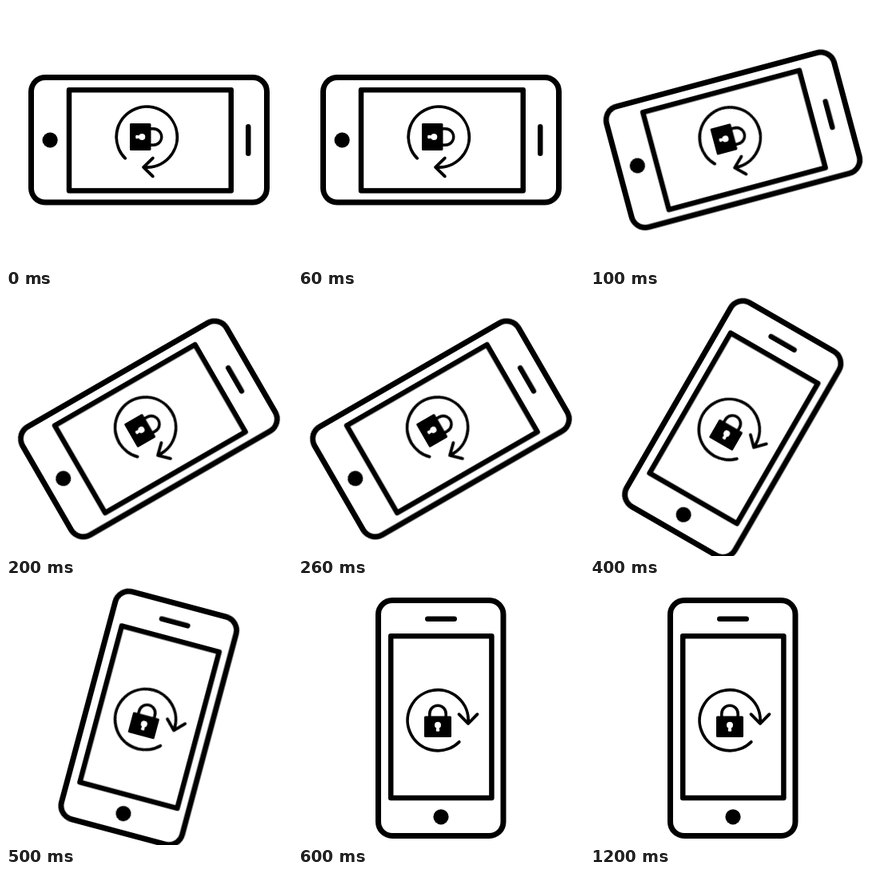
Write an HTML page that moves like this. It is 358 px wide and 327 px high and loops after 1600 ms.

```html
<!DOCTYPE html>
<html lang="en">
<head>
<meta charset="utf-8">
<title>Rotate phone</title>
<style>
  html, body {
    margin: 0;
    width: 100%;
    height: 100%;
    overflow: hidden;
    background: #fff;
  }
  svg {
    display: block;
    width: 358px;
    height: 327px;
  }
  .phone {
    fill: none;
    stroke: #000;
    stroke-linecap: round;
    stroke-linejoin: round;
    transform-origin: 179px 168px;
    animation: turn 1600ms infinite;
  }
  .solid { fill: #000; stroke: none; }
  .hole { fill: #fff; stroke: none; }

  /* Six hard 15-degree steps, then rest upright */
  @keyframes turn {
    0% { transform: rotate(90deg); animation-timing-function: steps(6, end); }
    37.5%, 100% { transform: rotate(0deg); }
  }
</style>
</head>
<body>
<svg viewBox="0 0 358 327">
  <g class="phone">
    <rect x="100.5" y="20.5" width="156.5" height="295" rx="17.5" stroke-width="7"/>
    <rect x="116.2" y="65.3" width="126.2" height="202.8" stroke-width="6.5"/>
    <path d="M162.3 43.7H195.7" stroke-width="6.5"/>
    <circle class="solid" cx="179" cy="291.8" r="9.6"/>

    <!-- Circular arrow -->
    <g stroke-width="3.8">
      <path d="M201.8 197.8A38 38 0 1 1 213 174"/>
      <path d="M201.5 163.2L213 174.8L224.5 163.2"/>
    </g>

    <!-- Padlock -->
    <path d="M164.8 167V162.5a10.2 10.2 0 0 1 20.4 0V167" stroke-width="3.6"/>
    <rect class="solid" x="158" y="165.4" width="34" height="26.6" rx="1.5"/>
    <circle class="hole" cx="175" cy="176.8" r="4"/>
    <path class="hole" d="M173.6 178h2.8l.8 5.4q0 1.4-1.4 1.4h-1.6q-1.4 0-1.4-1.4z"/>
  </g>
</svg>
</body>
</html>
```
